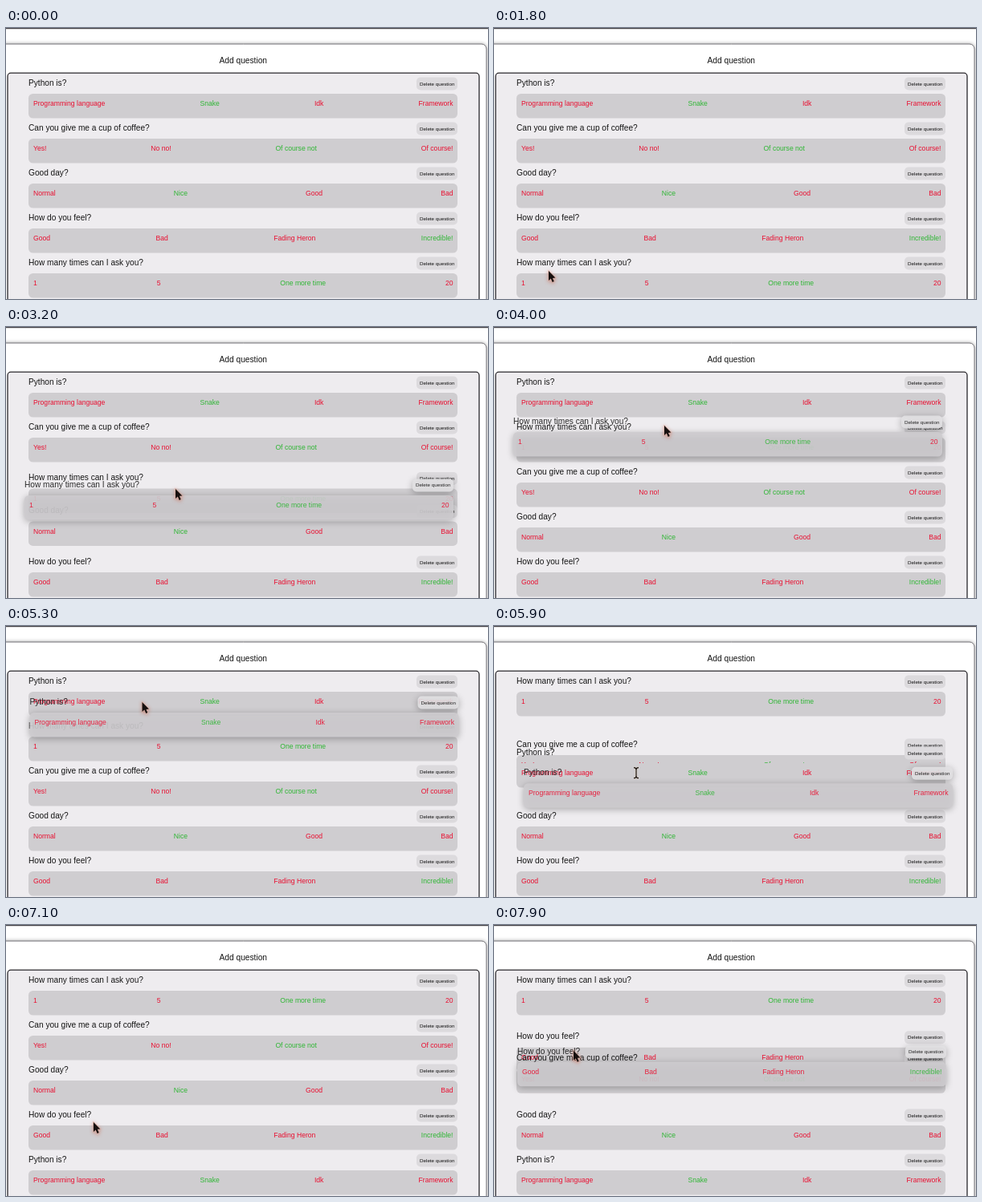
Write an HTML page with a canvas that moves like this. It is 600 px wide and 338 px high and loops after 8000 ms.

```html
<!DOCTYPE html>
<html lang="en">
<head>
<meta charset="utf-8">
<title>Sortable questions</title>
<style>
html, body { margin: 0; width: 100%; height: 100%; overflow: hidden; background: #fff; }
canvas { display: block; width: 600px; height: 338px; }
</style>
</head>
<body>
<canvas id="stage"></canvas>
<script>
const LOOP = 8000, W = 600, H = 338;
const FONT = '"Liberation Sans", Arial, sans-serif';
const TOP = 68, PITCH = 56, LEFT = 28, RIGHT = 562;
const RED = '#e90f30', GREEN = '#2fb634';

const canvas = document.getElementById('stage');
const ctx = canvas.getContext('2d');
const dpr = window.devicePixelRatio || 1;
canvas.width = W * dpr;
canvas.height = H * dpr;

// right: index of the green answer
const questions = [
  { title: 'Python is?', answers: ['Programming language', 'Snake', 'Idk', 'Framework'], right: 1 },
  { title: 'Can you give me a cup of coffee?', answers: ['Yes!', 'No no!', 'Of course not', 'Of course!'], right: 2 },
  { title: 'Good day?', answers: ['Normal', 'Nice', 'Good', 'Bad'], right: 1 },
  { title: 'How do you feel?', answers: ['Good', 'Bad', 'Fading Heron', 'Incredible!'], right: 3 },
  { title: 'How many times can I ask you?', answers: ['1', '5', 'One more time', '20'], right: 2 }
];

// [time, x, y] of the pointer tip
const path = [
  [550, -14, 334], [900, 20, 322], [1400, 68, 303], [1800, 68, 303],
  [2050, 112, 108], [2400, 216, 298], [2500, 216, 298], [2800, 214, 281],
  [3106, 212, 226], [3200, 211, 202], [3400, 210, 186], [3650, 211, 168],
  [4000, 212, 123], [4150, 212, 122], [4350, 212, 122], [4900, 168, 69],
  [5050, 168, 69], [5450, 171, 118], [5847, 176, 174], [5900, 177, 183],
  [6150, 179, 231], [6450, 183, 287], [6600, 184, 295], [6850, 185, 294],
  [7100, 109, 246], [7300, 98, 236], [7450, 98, 236], [7620, 98, 219],
  [7828, 99, 168], [7900, 99, 157], [8000, 100, 146]
];

// A drag keeps the grab point under the pointer.
const drags = [
  { from: 2550, to: 4150, item: 4, x: 216, y: 298 },
  { from: 5080, to: 6850, item: 0, x: 168, y: 69 },
  { from: 7480, to: 8001, item: 3, x: 98, y: 236 }
];

// [time, dragged item, item it trades places with]
const swaps = [
  [2800, 4, 3], [3106, 4, 2], [3650, 4, 1],
  [5450, 0, 4], [5847, 0, 1], [6150, 0, 2], [6450, 0, 3],
  [7620, 3, 2], [7828, 3, 1]
];
const SWAP_MS = 150;

const easeOut = k => 1 - (1 - k) ** 2;

function slope(i, c) {
  if (i <= 0 || i >= path.length - 1) return 0;
  const [a, b, d] = [path[i - 1], path[i], path[i + 1]];
  const before = (b[c] - a[c]) / (b[0] - a[0]);
  const after = (d[c] - b[c]) / (d[0] - b[0]);
  return before * after <= 0 ? 0 : 2 * before * after / (before + after);
}

// Monotone cubic interpolation along the path
function pointerAt(t) {
  let i = 0;
  while (i < path.length - 2 && t >= path[i + 1][0]) i++;
  const a = path[i], b = path[i + 1], span = b[0] - a[0];
  const k = Math.min(1, Math.max(0, (t - a[0]) / span));
  const mix = c => {
    const rest = 1 - k;
    return a[c] * (1 + 2 * k) * rest * rest + b[c] * k * k * (3 - 2 * k)
      + span * k * rest * (slope(i, c) * rest - slope(i + 1, c) * k);
  };
  return { x: mix(1), y: mix(2) };
}

function layoutAt(t) {
  const slot = questions.map((q, i) => i);
  const shown = slot.slice();
  for (const [time, a, b] of swaps) {
    if (t < time) break;
    const move = (slot[b] - slot[a]) * easeOut(Math.min(1, (t - time) / SWAP_MS));
    shown[a] += move;
    shown[b] -= move;
    [slot[a], slot[b]] = [slot[b], slot[a]];
  }
  return { slot, shown };
}

function box(x, y, w, h, r, fill) {
  ctx.beginPath();
  ctx.roundRect(x, y, w, h, r);
  ctx.fillStyle = fill;
  ctx.fill();
}

function text(str, x, y, size, color) {
  ctx.font = `${size}px ${FONT}`;
  ctx.fillStyle = color;
  ctx.fillText(str, x, y);
}

function shadow(color, blur, dy = 0) {
  ctx.shadowColor = color;
  ctx.shadowBlur = blur * dpr;
  ctx.shadowOffsetY = dy * dpr;
}

function drawCard(q, dx, y, lifted) {
  const raise = () => lifted && shadow('rgba(0,0,0,0.32)', 8, 2);
  const flat = () => shadow('transparent', 0);
  ctx.save();
  ctx.translate(dx, y);
  if (lifted) ctx.globalAlpha = 0.9;

  text(q.title, LEFT, 3.7, 10.15, '#151515');

  raise();
  box(511, -6.5, 51, 16, 5, lifted ? '#e3e1e4' : '#dcdadd');
  flat();
  text('Delete question', 515, 3.6, 6.25, '#111');

  raise();
  box(LEFT, 14, RIGHT - LEFT, 30.5, 5.5, '#cfcdd0');
  flat();

  ctx.font = `8.6px ${FONT}`;
  const widths = q.answers.map(a => ctx.measureText(a).width);
  const gap = (RIGHT - LEFT - 11.5 - widths.reduce((s, w) => s + w)) / 3;
  let x = LEFT + 6;
  q.answers.forEach((a, i) => {
    text(a, x, 29.3, 8.6, i === q.right ? GREEN : RED);
    x += widths[i] + gap;
  });
  ctx.restore();
}

function drawPage() {
  ctx.fillStyle = '#fff';
  ctx.fillRect(0, 0, W, H);
  ctx.fillStyle = '#454348';
  ctx.fillRect(0, 0, W, 1.2);

  ctx.save();
  shadow('rgba(0,0,0,0.45)', 5);
  box(-12, 20, 610, 360, 6, '#fff');
  ctx.restore();
  ctx.lineWidth = 1;
  ctx.strokeStyle = '#77757a';
  ctx.stroke();

  ctx.textAlign = 'center';
  text('Add question', 295.3, 44, 10.2, '#151515');
  ctx.textAlign = 'left';

  box(2, 56.2, 587, 320, 4, '#eeecef');
  ctx.lineWidth = 1.3;
  ctx.strokeStyle = '#29272b';
  ctx.stroke();
}

function drawArrow(x, y) {
  ctx.save();
  ctx.translate(x, y);
  ctx.beginPath();
  [[0, 0], [0, 12], [2.8, 9.6], [4.7, 14], [6.8, 13.1], [4.9, 8.9], [8.4, 8.6]]
    .forEach(p => ctx.lineTo(...p));
  ctx.closePath();
  shadow('rgba(205,75,45,0.75)', 4, 1);
  ctx.lineWidth = 1.1;
  ctx.strokeStyle = '#d9aea2';
  ctx.stroke();
  shadow('transparent', 0);
  ctx.fillStyle = '#17100f';
  ctx.fill();
  ctx.restore();
}

function drawBeam(x, y) {
  ctx.beginPath();
  ctx.moveTo(x - 3, y - 6.5);
  ctx.quadraticCurveTo(x, y - 6.5, x, y - 4);
  ctx.lineTo(x, y + 4);
  ctx.quadraticCurveTo(x, y + 6.5, x - 3, y + 6.5);
  ctx.moveTo(x + 3, y - 6.5);
  ctx.quadraticCurveTo(x, y - 6.5, x, y - 4);
  ctx.moveTo(x, y + 4);
  ctx.quadraticCurveTo(x, y + 6.5, x + 3, y + 6.5);
  ctx.lineWidth = 2.6;
  ctx.strokeStyle = 'rgba(225,205,185,0.7)';
  ctx.stroke();
  ctx.lineWidth = 1.2;
  ctx.strokeStyle = '#1a1614';
  ctx.stroke();
}

function draw(t) {
  ctx.setTransform(dpr, 0, 0, dpr, 0, 0);
  drawPage();

  const { slot, shown } = layoutAt(t);
  questions.map((q, i) => i)
    .sort((a, b) => slot[a] - slot[b])
    .forEach(i => drawCard(questions[i], 0, TOP + PITCH * shown[i], false));

  const tip = pointerAt(t);
  const drag = drags.find(d => t >= d.from && t < d.to);
  if (drag) {
    const home = layoutAt(drag.from).slot[drag.item];
    drawCard(questions[drag.item], tip.x - drag.x, TOP + PITCH * home + tip.y - drag.y, true);
  }

  if (t < path[0][0]) return;
  const overText = t >= 5840 && t < 6040;
  (overText ? drawBeam : drawArrow)(tip.x, tip.y);
}

const start = performance.now();
function tick() {
  draw((performance.now() - start) % LOOP);
  requestAnimationFrame(tick);
}
tick();
</script>
</body>
</html>
```
